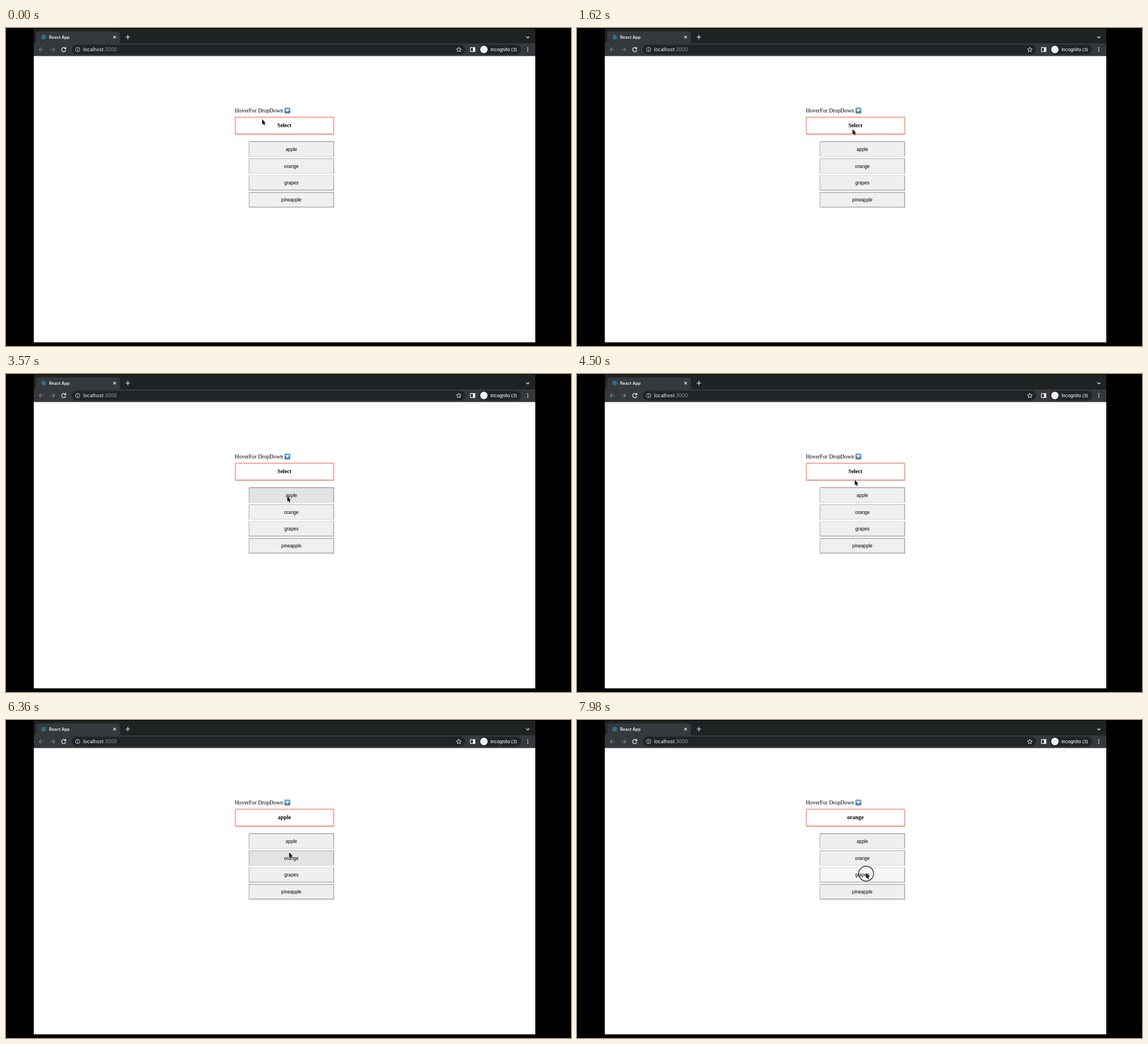
An HTML page that plays this animation: 997x561 px, repeating every 8 s.

```html
<!DOCTYPE html>
<html lang="en">
<head>
<meta charset="utf-8">
<title>Hover dropdown</title>
<style>
  html, body { margin: 0; width: 100%; height: 100%; overflow: hidden; background: #000; }
  svg { display: block; width: 100vw; height: 100vh; }
  .ui { font-family: Inter, Roboto, sans-serif; fill: #f1f3f4; }
  .serif { font: 9.84px "Liberation Serif", "Times New Roman", serif; }
  .item text { font: 8.2px "Liberation Sans", Arial, sans-serif; text-anchor: middle; }
  .line { fill: none; stroke: #f1f3f4; stroke-width: 1.2; }
  .dim { stroke: #7d8084; }
</style>
</head>
<body>
<svg viewBox="0 0 997 561">
  <defs>
    <linearGradient id="blue" x2="0" y2="1">
      <stop stop-color="#79a9c9"/><stop offset="1" stop-color="#467ba5"/>
    </linearGradient>
  </defs>
  <rect width="997" height="561"/>
  <rect x="49" y="1" width="885" height="27" fill="#1f2324"/>
  <path d="M49 27Q53 27 53 23V11Q53 6 58 6H196Q201 6 201 11V23Q201 27 205 27H934V50H49Z" fill="#35383c"/>
  <rect x="49" y="49.5" width="885" height="505" fill="#fff"/>

  <g class="ui">
    <circle cx="66.5" cy="16" r="4.3" fill="#2b7186"/>
    <text x="76" y="18.8" font-size="7.3" font-weight="600">React App</text>
    <path class="line" d="M189.3 13.8l4.6 4.6m0-4.6l-4.6 4.6M211 16h8m-4-4v8M918.2 15l2.6 2.6 2.6-2.6"/>
    <path class="line dim" d="M66.5 38h-8m3.7-3.7L58.5 38l3.7 3.7M78 38h8m-3.7-3.7L86 38l-3.7 3.7"/>
    <path class="line" d="M104.6 35.6a3.7 3.7 0 1 0 .9 3.2M105.5 33.6v3h-3"/>
    <rect x="116" y="29.5" width="694" height="17" rx="8.5" fill="#202426"/>
    <circle class="line" cx="126.5" cy="38" r="3.8" style="stroke-width:.8"/>
    <path class="line" d="M126.5 37.5v2.7m0-4.7v1" style="stroke-width:.9"/>
    <text x="136" y="41" font-size="8.45">localhost<tspan fill="#9aa0a6">:3000</tspan></text>
    <path class="line" style="stroke-width:.9" d="M799 33.8l1.2 2.8 3 .3-2.3 2 .7 3-2.6-1.6-2.6 1.6.7-3-2.3-2 3-.3z"/>
    <rect class="line" x="819.5" y="34.5" width="8" height="7"/>
    <rect x="824" y="34.5" width="4" height="7"/>
    <rect x="835" y="29.5" width="74" height="17" rx="8.5" fill="#202426"/>
    <circle cx="843.3" cy="37.8" r="6.6"/>
    <text x="855" y="40.7" font-size="7.7" font-weight="500">Incognito (3)</text>
    <circle cx="920.7" cy="35" r=".9"/><circle cx="920.7" cy="38" r=".9"/><circle cx="920.7" cy="41" r=".9"/>
  </g>

  <text class="serif" x="404" y="149.3">HoverFor DropDown</text>
  <rect x="491.3" y="140.3" width="10.4" height="10.4" rx="1.6" fill="url(#blue)"/>
  <path d="M493 143.3h7l-3.5 5z" fill="#fff"/>
  <rect x="404.6" y="157.4" width="173.8" height="29.8" rx="1" fill="#fff" stroke="#f4735f" stroke-width="1.2"/>
  <path d="M405 187.6H578.5" stroke="#e8705e"/>
  <text id="choice" class="serif" x="491.3" y="175.2" text-anchor="middle" font-weight="bold"
    style="font-weight:bold"></text>
  <g id="menu"></g>
  <circle id="ring" r="13.2" fill="none" stroke="#222" stroke-width="1.3"/>
  <path id="cursor" d="M0 0V9.2L2 7.4 3.5 10.8 5 10.1 3.6 6.9H6.2Z" stroke="#fff" stroke-width=".7" paint-order="stroke"/>
</svg>
<script>
const LOOP = 8000;
const $ = id => document.getElementById(id);
const within = (v, [a, b]) => v >= a && v < b;

const DARK = '#777', LIGHT = '#d4d4d4';
const items = [
  { name: 'apple', y: 200.5, top: DARK, bottom: LIGHT },
  { name: 'orange', y: 230.5, top: '#aaa', bottom: LIGHT },
  { name: 'grapes', y: 260, top: LIGHT, bottom: DARK },
  { name: 'pineapple', y: 290, top: DARK, bottom: DARK }
];

// Pointer stops: time, x, y
const path = [
  [0, 452, 161], [30, 452, 161], [210, 500, 300], [380, 515, 360], [640, 480, 185], [810, 478, 167],
  [1320, 478, 167], [1620, 486.3, 178.5], [2100, 520, 290],
  [2400, 600, 302], [2670, 674.5, 312.5], [2910, 560, 290],
  [3150, 505, 185], [3400, 492, 180], [3720, 500, 245],
  [3840, 500, 245], [4050, 505, 300], [4260, 493, 197],
  [4440, 493, 197], [4500, 490.3, 187], [4740, 498, 210],
  [5370, 498, 210], [5800, 505, 300], [6150, 498, 238],
  [6360, 499.7, 233.5], [6720, 505, 240],
  [6930, 505, 240], [7440, 511, 242], [7710, 509, 268], [7840, 510.2, 270], [LOOP, 510.2, 270]
];
const closed = [[250, 630], [2330, 3130]];
const presses = [[4920, 5080], [6940, 7100], [7860, LOOP]];

$('menu').innerHTML = items.map(({ name, y, top, bottom }) => `<g class="item">
  <rect x="428.5" y="${y}" width="150" height="26.5" rx="1"/>
  <path d="M428.8 ${y}v26.5" stroke="#999" stroke-width=".8"/>
  <path d="M578.3 ${y}v26.5" stroke="${DARK}" stroke-width=".9"/>
  <path d="M429 ${y}h149.5" stroke="${top}" stroke-width=".9"/>
  <path d="M429 ${y + 26}h149.5" stroke="${bottom}" stroke-width=".9"/>
  <text x="503.6" y="${y + 16.3}">${name}</text></g>`).join('');
const faces = [...document.querySelectorAll('.item > rect')];

function pointer(t) {
  const i = path.findIndex(p => p[0] > t);
  const [t0, x0, y0] = path[i - 1], [t1, x1, y1] = path[i];
  const u = (t - t0) / (t1 - t0), k = u * u * (3 - 2 * u);
  return [x0 + (x1 - x0) * k, y0 + (y1 - y0) * k];
}

function draw(t) {
  const [x, y] = pointer(t);
  const press = presses.find(p => within(t, p));
  $('menu').style.display = closed.some(c => within(t, c)) ? 'none' : '';
  items.forEach((item, i) => {
    const hover = within(x, [428.5, 578.5]) && within(y, [item.y, item.y + 26.5]);
    faces[i].setAttribute('fill', !hover ? '#efefef' : press ? '#f5f5f5' : '#e3e3e3');
  });
  $('choice').textContent = t < presses[0][1] ? 'Select' : t < presses[1][1] ? 'apple' : 'orange';
  $('cursor').setAttribute('transform', `translate(${x} ${y})`);
  $('ring').setAttribute('transform', `translate(${x} ${y + 1})`);
  $('ring').setAttribute('opacity', press ? Math.min(1, (t - press[0]) / 80) : 0);
}

const start = performance.now();
(function tick() {
  draw((performance.now() - start) % LOOP);
  requestAnimationFrame(tick);
})();
</script>
</body>
</html>
```
